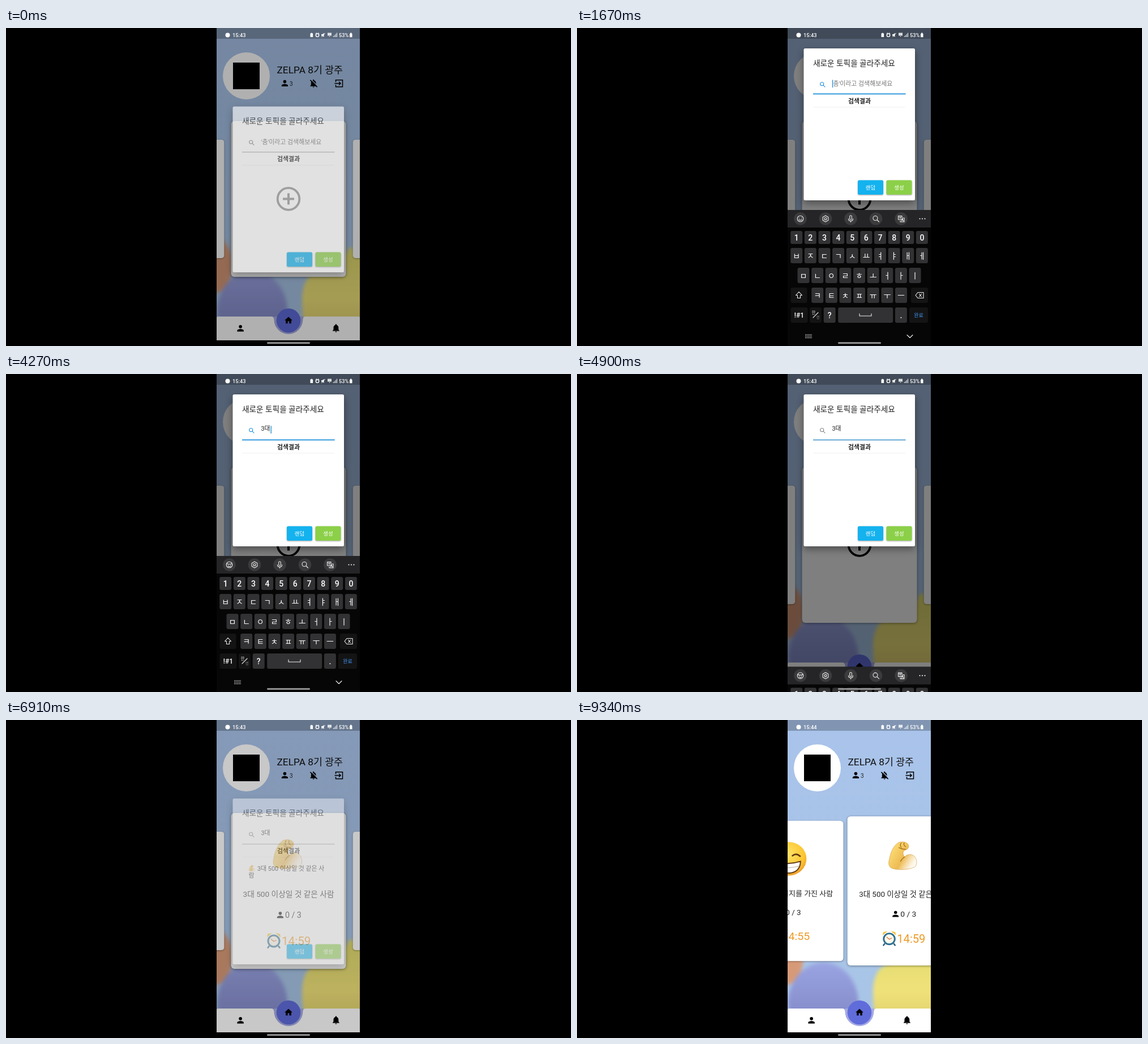
An HTML page that plays this animation: 998x561 px, repeating every 9.37 s.

```html
<!DOCTYPE html>
<html lang="ko">
<head>
<meta charset="utf-8">
<title>토픽 만들기</title>
<style>
  html, body { margin: 0; width: 100%; height: 100%; overflow: hidden; background: #000; }
  svg { display: block; }
  text { font-family: Roboto, "Noto Sans CJK KR", "Noto Sans CJK JP", "Noto Sans CJK", sans-serif; white-space: pre; }
  .card { filter: drop-shadow(0 1px 2px rgba(0,0,0,.4)); }
  .sheet { filter: drop-shadow(0 5px 7px rgba(0,0,0,.4)); }
  .btn { filter: drop-shadow(0 1px 1px rgba(0,0,0,.35)); }
  .blur { filter: blur(3px); }
  .line { fill: none; stroke: #eee; stroke-width: 1.1; stroke-linecap: round; stroke-linejoin: round; }
</style>
</head>
<body>
<svg id="stage" width="998" height="561" viewBox="0 0 998 561">
  <defs>
    <clipPath id="screen"><rect x="372" width="253" height="561"/></clipPath>
    <linearGradient id="sky" x2="0" y2="1">
      <stop offset="0" stop-color="#a9c3ea"/><stop offset="1" stop-color="#a8c5e6"/>
    </linearGradient>
    <linearGradient id="violet" x2="0" y2="1">
      <stop offset="0" stop-color="#9aa4e2"/><stop offset="1" stop-color="#7a7fbd"/>
    </linearGradient>
    <linearGradient id="yellow" x2="0" y2="1">
      <stop offset="0" stop-color="#ded96e"/><stop offset=".5" stop-color="#f0e27a"/><stop offset="1" stop-color="#d3c264"/>
    </linearGradient>
    <linearGradient id="skin" x2="1" y2=".6">
      <stop offset=".2" stop-color="#fbd970"/><stop offset=".65" stop-color="#edbb55"/><stop offset="1" stop-color="#f3cf85" stop-opacity=".15"/>
    </linearGradient>
    <radialGradient id="face" cx=".45" cy=".35" r=".7">
      <stop offset="0" stop-color="#ffe56a"/><stop offset=".7" stop-color="#fcc531"/><stop offset="1" stop-color="#e8922a"/>
    </radialGradient>
    <path id="person" d="M12 12a4 4 0 1 0 0-8 4 4 0 0 0 0 8zm0 2c-2.700 0-8 1.300-8 4v2h16v-2c0-2.700-5.300-4-8-4z"/>
    <path id="bell" d="M4 19v-1l2-2v-5c0-3.100 1.600-5.600 4.500-6.300V4a1.500 1.500 0 0 1 3 0v.7C16.400 5.400 18 7.900 18 11v5l2 2v1zM10 20h4a2 2 0 0 1-4 0z"/>
    <path id="home" d="M10 20v-6h4v6h5v-8h3L12 3 2 12h3v8z"/>
    <g id="lens" fill="none" stroke-width="2"><circle cx="9.500" cy="9.500" r="5.500"/><path d="M14 14l5.700 5.700"/></g>
    <g id="arm">
      <path d="M17 4C22 0 33 1 36 6c2 4 1 8-3 10-4 1-6 3-6 6 0 3 1 6 3 7 4-5 14-6 19 1 4 7 3 15-1 18-12 6-33 6-42 2-5-3-6-8-4-16C4 22 9 10 17 4z" fill="url(#skin)" stroke="#c98f35" stroke-opacity=".55"/>
      <path d="M24 3q-4 5 0 9M29 3q-2 5 3 8M19 12q6 4 13 3M30 29q-5 3-8 9" fill="none" stroke="#a8731f" stroke-width="1.400"/>
    </g>
    <g id="clock">
      <path d="M5 24l-3 4M21 24l3 4" stroke="#2b5f7d" stroke-width="2.500"/>
      <path d="M1 9l1-6 8-2zM25 9l-1-6-8-2z" fill="#f5c23c"/>
      <circle cx="13" cy="15.500" r="10" fill="#fdf8ea" stroke="#2f7192" stroke-width="3"/>
      <path d="M8 12l5 4 5-2" fill="none" stroke="#d9703c" stroke-width="1.300"/>
    </g>
    <g id="grin">
      <circle r="33" fill="url(#face)"/>
      <path d="M-23-3q8-9 15 0M7-6q7-6 14 1" fill="none" stroke="#633a14" stroke-width="3" stroke-linecap="round"/>
      <path d="M-22 8q22 4 44-3-1 21-20 23-20 0-24-20z" fill="#fff" stroke="#633a14" stroke-width="2"/>
      <path d="M-20 17q20 3 40-3" fill="none" stroke="#b9a58c"/>
    </g>
  </defs>
  <g clip-path="url(#screen)">
    <g id="app">
      <rect x="372" width="253" height="551" fill="url(#sky)"/>
      <g class="blur">
        <ellipse cx="366" cy="418" rx="34" ry="50" fill="#d79a78"/>
        <ellipse cx="435" cy="500" rx="62" ry="72" fill="url(#violet)"/>
        <path d="M523 475q2-40 30-45 40-10 52-42h40v180h-105q-18-40-17-93z" fill="url(#yellow)"/>
      </g>
      <rect x="372" width="253" height="19" opacity=".24"/>
      <circle cx="424.500" cy="84.500" r="41.500" fill="#fff"/>
      <rect x="401" y="61" width="47" height="47"/>
      <g id="head"></g>
      <use href="#person" transform="translate(484 89) scale(.7)"/>
      <g transform="translate(534.500 89) scale(.72)">
        <use href="#bell"/>
        <path d="M6 2.500l17 17" stroke="#a9c3ea" stroke-width="2"/><path d="M4 4l17 17" stroke="#000" stroke-width="2"/>
      </g>
      <path d="M582.500 95v-3.500h12v12h-12V100M580.500 97.500h10M588 94.500l3 3-3 3" transform="translate(0 .3)" fill="none" stroke="#000" stroke-width="1.500"/>
      <g id="cards"></g>
      <path d="M473 509a26 32 0 0 0 52 0z" fill="#a5a9e4"/>
      <path d="M372 551V511q0-2 3-2h94q4 0 4.500 5a25.500 26 0 0 0 51 0q.5-5 4.500-5h93q3 0 3 2v40z" fill="#fff"/>
      <circle cx="499" cy="516" r="21.300" fill="#606cda"/>
      <use href="#home" transform="translate(490.700 507.500) scale(.69)"/>
      <use href="#person" transform="translate(405.500 521) scale(.72)"/>
      <use href="#bell" transform="translate(574 520.500) scale(.74)"/>
    </g>
    <rect id="shade" x="372" width="253" height="551"/>
    <rect x="372" y="551" width="253" height="10"/>
    <g id="dialog">
      <rect id="paper" class="sheet" x="400.500" width="196.500" rx="2.500" fill="#fff"/>
      <g id="top"></g>
      <g id="bottom"></g>
    </g>
    <g id="keys"></g>
    <g id="navIcons">
      <path class="line" stroke-dasharray="1 1.600" d="M403.500 541h11M403.500 543.700h11M403.500 546.500h11" stroke-width="1.600"/>
      <path class="line" d="M583 541.500l5 5 5-5"/>
    </g>
    <rect x="461" y="554.300" width="76" height="2.800" rx="1.400" fill="#999"/>
    <g id="status" fill="#fff">
      <circle cx="391.500" cy="12.500" r="4"/>
      <path d="M537.500 10q2.300-3 4.600 0v6h-4.600z"/>
      <circle cx="550" cy="12.700" r="2.700" fill="none" stroke="#fff" stroke-width="1.400"/>
      <path d="M546.800 10l2-1.700M553.200 10l-2-1.700M563.500 9l-6 7" stroke="#fff"/>
      <path d="M557 11h2l2.500-2.300v7.300l-2.500-2.300h-2z"/>
      <path d="M568 8.500h7v5h-7zM570 13l1.500 3 1.500-3z" opacity=".8"/>
      <path d="M578.500 16v-2M580.500 16v-3.500M582.500 16v-5.500M584.500 16V8.500" stroke="#fff" stroke-width="1.200" opacity=".8"/>
      <path d="M607 10h1v-1.500h2.500V10h1v6.200h-4.500z"/>
    </g>
  </g>
</svg>
<script>
const LOOP = 9370, BLUE = '#2492dc';
const $ = id => document.getElementById(id);

function add(parent, tag, attrs = {}, content) {
  const el = document.createElementNS('http://www.w3.org/2000/svg', tag);
  for (const k in attrs) el.setAttribute(k, attrs[k]);
  if (content !== undefined) el.textContent = content;
  parent.append(el);
  return el;
}
const set = (el, attrs) => { for (const k in attrs) el.setAttribute(k, attrs[k]); };
const show = (el, on) => el.setAttribute('visibility', on ? 'inherit' : 'hidden');
const icon = (parent, id, x, y, scale, attrs) =>
  add(parent, 'use', { href: '#' + id, transform: `translate(${x} ${y}) scale(${scale})`, ...attrs });

// Text placed by the middle of its line
const label = (parent, x, mid, size, str, attrs) =>
  add(parent, 'text', { x, y: mid + size * .37, 'font-size': size, fill: '#222', ...attrs }, str);
const centred = { 'text-anchor': 'middle' };

// Header and status bar
label($('head'), 478.5, 73.5, 17.3, 'ZELPA 8기 광주', { fill: '#111' });
label($('head'), 501, 98, 10, '3');
const clockText = label($('status'), 400, 12.3, 9.3, '15:43', { fill: '#fff', 'font-weight': 500 });
label($('status'), 588, 12.3, 9.2, '53%', { fill: '#fff', 'font-weight': 500 });

// Carousel
function card(build) {
  const g = add($('cards'), 'g');
  add(g, 'rect', { class: 'card', x: -101.5, y: -137.5, width: 203, height: 275, rx: 6, fill: '#fff' });
  build(g);
  return g;
}
const topic = (emoji, x, y, title, time) => g => {
  icon(g, emoji, x, y, 1);
  label(g, 0, 5.5, 13.7, title, centred);
  icon(g, 'person', -23, 34, .7);
  label(g, -6, 42.5, 14.2, '0 / 3');
  icon(g, 'clock', -39, 73, 1);
  label(g, -12, 88, 20.6, time, { fill: '#ee9a26' });
};
const plus = g => {
  add(g, 'circle', { r: 19.3, fill: 'none', stroke: '#000', 'stroke-width': 3.8 });
  add(g, 'path', { d: 'M-10 0H10M0-10V10', stroke: '#000', 'stroke-width': 4 });
};
const leftCard = card(topic('grin', 0, -63, '제일 밝은 이미지를 가진 사람', '14:55'));
const rightCard = card(() => {});
const plusCard = card(plus);
const newCard = card(topic('arm', -28, -92, '3대 500 이상일 것 같은 사람', '14:59'));

function place(el, offset) {
  const d = Math.min(1, Math.abs(offset) / 203);
  const sy = 1 - .24 * d ** 1.8;
  set(el, { transform: `translate(${499 + offset} 301.5) scale(${(1 + sy) / 2} ${sy})` });
}

// Dialog
const top_ = $('top'), bottom = $('bottom');
label(top_, 417, 25.5, 13.65, '새로운 토픽을 골라주세요', { 'font-weight': 500 });
const lens = icon(top_, 'lens', 427.5, 57.5, .55);
const hint = label(top_, 450.5, 62.5, 10.9, "'춤'이라고 검색해보세요", { fill: '#757575' });
const typed = label(top_, 450.5, 60, 10.9, '');
set(hint, { y: 66.2 });
set(typed, { y: 64 });
const composing = add(top_, 'rect', { x: 457, y: 67, width: 10, height: .8, fill: '#333' });
const caret = add(top_, 'rect', { y: 55.5, width: 1.4, height: 13.5, fill: BLUE });
add(top_, 'rect', { x: 417, y: 80, width: 163.5, height: .9, fill: '#8c8c8c' });
const underline = add(top_, 'rect', { x: 417, y: 79.4, width: 163.5, height: 1.8, fill: BLUE });
label(top_, 499, 92.5, 10.9, '검색결과', { ...centred, 'font-weight': 700 });
add(top_, 'rect', { x: 417, y: 103, width: 163, height: .8, fill: '#eee' });
const result = add(top_, 'g');
icon(result, 'arm', 429, 117.5, .21);
label(result, 444, 123, 10.9, '3대 500 이상일 것 같은 사');
label(result, 428.5, 135.5, 10.9, '람');
[[496, '랜덤', '#14b2ee'], [546.5, '생성', '#8bd048']].forEach(([x, str, fill]) => {
  add(bottom, 'rect', { class: 'btn', x, y: -35.5, width: 45, height: 25.5, rx: 2.5, fill });
  label(bottom, x + 22.5, -22.7, 9.4, str, { ...centred, fill: '#fff', 'font-weight': 500 });
});

// Keyboard, laid out at its resting place
const kb = $('keys');
add(kb, 'rect', { x: 372, y: 321, width: 253, height: 240, fill: '#060606' });
add(kb, 'rect', { x: 372, y: 321, width: 253, height: 31, fill: '#252527' });
[394.5, 439, 483.5, 528, 572.5].forEach(cx => add(kb, 'circle', { cx, cy: 336.5, r: 11.3, fill: '#3b3b3d' }));
const drawIcon = (x, d) => add(kb, 'path', { class: 'line', d, transform: `translate(${x} 336.5)` });
const ring = r => `M${-r} 0a${r} ${r} 0 1 0 ${2 * r} 0a${r} ${r} 0 1 0 ${-2 * r} 0`;
const smiley = drawIcon(394.5, ring(5.3) + 'M-2-1.500v.2M2-1.500v.2M-2.500 1.500q2.500 2.500 5 0');
const sticker = drawIcon(394.5, ring(5.3) + 'M-5-2q5 2 10 0M-2 .5v.2M2 .5v.2M-2 2.500q2 1.500 4 0');
const hex = [...Array(7)].map((_, i) => {
  const a = i * Math.PI / 3 + Math.PI / 6;
  return (i ? 'L' : 'M') + (5.6 * Math.cos(a)).toFixed(2) + ' ' + (5.6 * Math.sin(a)).toFixed(2);
}).join('');
drawIcon(439, hex + ring(2));
drawIcon(483.5, 'M-1.800-4a1.800 1.800 0 0 1 3.600 0v4a1.800 1.800 0 0 1-3.600 0zM-4 0q0 4 4 4t4-4M0 4v2');
drawIcon(528, 'M-5-1a4 4 0 1 0 8 0a4 4 0 1 0-8 0M2 2l3.500 3.500');
drawIcon(572.5, 'M-5-5h6.500v6.500h-6.500zM-1.500 3.500v2h7v-7h-2M-3.500-3h3.500M-1.700-3v3M1 4l1.500-4 1.500 4');
[605.5, 610, 614.5].forEach(cx => add(kb, 'circle', { cx, cy: 336.5, r: 1.1, fill: '#eee' }));

function key(x, y, w, h, str, fill = '#323234', size = 14, color = '#fff') {
  add(kb, 'rect', { x: x - w / 2, y: y - h / 2, width: w, height: h, rx: 3, fill });
  label(kb, x, y, size, str, { ...centred, fill: color, 'font-weight': 500 });
}
[['1234567890', 387.7, 369.5, 23], ['ㅂㅈㄷㄱㅅㅛㅕㅑㅐㅔ', 387.7, 401.5, 27],
 ['ㅁㄴㅇㄹㅎㅗㅓㅏㅣ', 400, 436.5, 27], ['ㅋㅌㅊㅍㅠㅜㅡ', 424.7, 471.5, 27]]
  .forEach(([row, x, y, h]) => [...row].forEach((c, i) => key(x + i * 24.63, y, 21, h, c)));
const DARK = '#141415';
key(392, 471.5, 29, 27, '', DARK);
key(605, 471.5, 30, 27, '', DARK);
key(392.5, 506.5, 30, 27, '!#1', DARK, 12);
key(421.5, 506.5, 21, 27, '', DARK);
label(kb, 418, 502.5, 7.5, '한', { ...centred, fill: '#ddd' });
label(kb, 425.5, 510.5, 6.5, '영', { ...centred, fill: '#888' });
key(446.2, 506.5, 21, 27, '?');
key(509.7, 506.5, 97, 27, '');
key(572.4, 506.5, 21, 27, '.');
key(603.5, 506.5, 33, 27, '완료', DARK, 9, '#3f8fe8');
const line = d => add(kb, 'path', { class: 'line', d });
line('M392 465.500l5.500 6h-3v5h-5v-5h-3z');
line('M598 471.500l4-5h10v10h-10zM604.500 469l4 5M608.500 469l-4 5');
line('M417 511l9-9');
line('M499 504v4h21v-4');

// Piecewise linear value from [time, value] steps
function tween(t, steps) {
  if (t <= steps[0][0]) return steps[0][1];
  for (let i = 1; i < steps.length; i++) {
    const [a, va] = steps[i - 1], [b, vb] = steps[i];
    if (t < b) return va + (vb - va) * (t - a) / (b - a);
  }
  return steps[steps.length - 1][1];
}
const easeOut = u => 1 - (1 - u) ** 2;
const TYPING = [[0, ''], [1900, '3'], [2450, '3ㄷ'], [2800, '3대']];

function render(t) {
  const fade = tween(t, [[30, .62], [170, 1], [6780, 1], [7010, 0]]);
  set($('dialog'), { opacity: fade });
  set($('shade'), { opacity: fade * .5 });

  const raised = t >= 1110 && t < 5060;
  const y = raised ? 36 : 138.5, h = raised ? 268 : 292.5;
  set($('paper'), { y, height: h });
  set(top_, { transform: `translate(0 ${y})` });
  set(bottom, { transform: `translate(0 ${y + h})` });

  const open = easeOut(tween(t, [[800, 0], [1100, 1]])) - easeOut(tween(t, [[4730, 0], [5030, 1]]));
  set(kb, { transform: `translate(0 ${240 * (1 - open)})` });
  show(kb, open > 0);
  show($('navIcons'), t >= 800 && t < 4730);
  show(smiley, t < 2900);
  show(sticker, t >= 2900);

  const text = TYPING.filter(s => s[0] <= t).pop()[1];
  const focused = t >= 640 && t < 4870;
  if (typed.textContent !== text) typed.textContent = text;
  show(hint, !text);
  show(composing, text.length > 1 && t < 4140);
  const lastKey = [640, 1900, 2450, 2800].filter(k => k <= t).pop() || 0;
  show(caret, focused && (t - lastKey) % 1000 < 500);
  set(caret, { x: [450.8, 457.3, 467.5][text.length] });
  set(lens, { stroke: focused ? BLUE : '#858585' });
  set(underline, { opacity: tween(t, [[640, 0], [800, 1], [4860, 1], [4980, 0]]) });
  show(result, t >= 5110);

  const made = t >= 6780;
  show(plusCard, !made);
  show(newCard, made);
  const drag = tween(t, [[9170, 0], [9340, 78]]);
  place(leftCard, drag - 203);
  place(rightCard, drag + 203);
  place(plusCard, drag);
  place(newCard, drag);

  const time = t < 7310 ? '15:43' : '15:44';
  if (clockText.textContent !== time) clockText.textContent = time;
}

const start = performance.now();
function tick() {
  render((performance.now() - start) % LOOP);
  requestAnimationFrame(tick);
}
tick();
</script>
</body>
</html>
```
